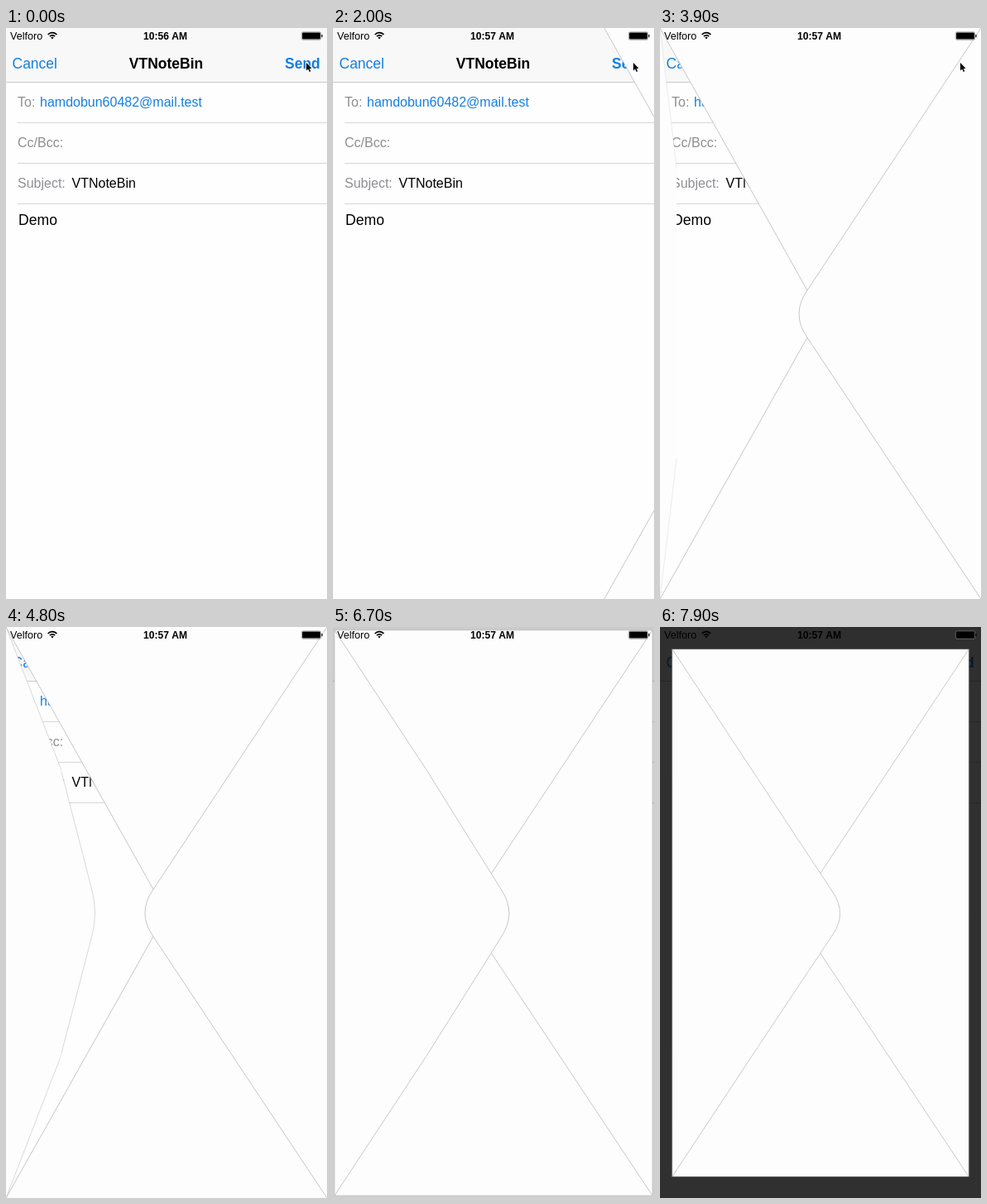
An HTML page with a canvas for the animation above (8000 ms loop, 388 by 690 pixels).

```html
<!DOCTYPE html>
<html lang="en">
<head>
<meta charset="utf-8">
<title>Mail folding into an envelope</title>
<style>
  html, body { margin: 0; width: 100%; height: 100%; overflow: hidden; background: #fefefe; }
  canvas { display: block; width: 388px; height: 690px; }
</style>
</head>
<body>
<canvas id="stage"></canvas>
<script>
const W = 388, H = 690, LOOP = 8;
const BLUE = '#147fe2', GREY = '#8e8e93', PAPER = '#fdfdfd', EDGE = '#b8b8b8';
const FONT = '"Liberation Sans", Arial, sans-serif';

const canvas = document.getElementById('stage');
const ctx = canvas.getContext('2d');
const dpr = window.devicePixelRatio || 1;
canvas.width = W * dpr;
canvas.height = H * dpr;

// Keys of [time, value], joined by straight lines.
const FOLD_INNER = [[3.5, 91], [3.9, 79.7], [5.6, 31.5], [6.7, 5], [6.9, 0]];
const FOLD_TIP = [[3.5, 104], [3.9, 93], [5.6, 44], [6.7, 19.3], [7.4, 0]];
const SHRINK = [[6.5, 0], [6.7, 0.01], [7.2, 0.044], [7.9, 0.0765]];
const DIM = [[6.5, 0], [6.7, 0.18], [7.2, 0.48], [7.9, 0.81]];

function along(keys, t) {
  if (t <= keys[0][0]) return keys[0][1];
  for (let i = 1; i < keys.length; i++) {
    const [t0, a] = keys[i - 1], [t1, b] = keys[i];
    if (t < t1) return a + (b - a) * (t - t0) / (t1 - t0);
  }
  return keys[keys.length - 1][1];
}

const cosDeg = deg => Math.cos(deg * Math.PI / 180);

function text(str, x, y, size, color = '#000', bold = false, align = 'left') {
  ctx.font = `${bold ? 'bold ' : ''}${size}px ${FONT}`;
  ctx.fillStyle = color;
  ctx.textAlign = align;
  ctx.fillText(str, x, y);
}

function rect(x, y, w, h, color) {
  ctx.fillStyle = color;
  ctx.fillRect(x, y, w, h);
}

function poly(points) {
  ctx.beginPath();
  points.forEach(([x, y]) => ctx.lineTo(x, y));
}

function stroke(alpha = 1) {
  ctx.globalAlpha = alpha;
  ctx.strokeStyle = EDGE;
  ctx.lineWidth = 0.8;
  ctx.stroke();
  ctx.globalAlpha = 1;
}

function drawPage() {
  rect(0, 0, W, H, '#fefefe');
  rect(0, 0, W, 65, '#f8f8f8');
  rect(0, 65, W, 1, '#cacaca');
  [114, 163, 212].forEach(y => rect(14, y, W - 14, 1, '#d6d6d8'));
  text('Cancel', 7.5, 49, 17.5, BLUE);
  text('VTNoteBin', 193.5, 49, 17.5, '#000', true, 'center');
  text('Send', 337, 49, 17.5, BLUE, true);
  text('To:', 14, 95, 16, GREY);
  text('hamdobun60482@mail.test', 41, 95, 16, BLUE);
  text('Cc/Bcc:', 14, 144, 16, GREY);
  text('Subject:', 14, 193, 16, GREY);
  text('VTNoteBin', 79.5, 193, 16);
  text('Demo', 15, 238, 17.6);
}

function drawStatus(t) {
  text('Velforo', 5, 14, 12.6);
  text(t < 1.2 ? '10:56 AM' : '10:57 AM', 192.5, 14, 12.1, '#000', true, 'center');

  ctx.strokeStyle = '#000';
  ctx.lineWidth = 1.7;
  [4.2, 7.3].forEach(r => {
    ctx.beginPath();
    ctx.arc(56, 13, r, -Math.PI * 0.76, -Math.PI * 0.24);
    ctx.stroke();
  });
  ctx.fillStyle = '#000';
  ctx.beginPath();
  ctx.moveTo(56, 13.6);
  ctx.arc(56, 13, 2.2, -Math.PI * 0.78, -Math.PI * 0.22);
  ctx.fill();

  ctx.strokeStyle = '#777';
  ctx.lineWidth = 0.6;
  ctx.beginPath();
  ctx.roundRect(357.3, 4.8, 23.4, 9.6, 1.8);
  ctx.stroke();
  ctx.beginPath();
  ctx.roundRect(358.1, 5.6, 21.8, 8, 1);
  ctx.fill();
  rect(381.3, 8, 1.2, 3.2, '#000');
}

// Pocket with the right flap glued over its top and bottom.
function drawPocket() {
  const pocket = () => {
    ctx.lineTo(178, 317);
    ctx.quadraticCurveTo(158, 345.5, 178, 374);
  };
  ctx.beginPath();
  ctx.moveTo(0, 0);
  pocket();
  ctx.lineTo(0, H);
  ctx.lineTo(W, H);
  ctx.lineTo(W, 0);
  ctx.closePath();
  ctx.fillStyle = PAPER;
  ctx.fill();
  poly([[0, 0], [178, 317]]);
  stroke();
  poly([[0, H], [178, 374]]);
  stroke();
  ctx.beginPath();
  ctx.moveTo(W, 0);
  pocket();
  ctx.lineTo(W, H);
  stroke();
}

// Left flap: two hinged panels, seen flat, so each narrows by its cosine.
function drawFlap(t) {
  const c1 = cosDeg(along(FOLD_INNER, t));
  const c2 = cosDeg(along(FOLD_TIP, t));
  if (c1 <= 0) return;
  const hinge = 112 * c1, top = 169.5, bottom = H - top;
  const alpha = Math.min(1, 0.2 + 0.8 * c1);

  ctx.fillStyle = PAPER;
  if (c2 > 0) {
    ctx.beginPath();
    ctx.moveTo(hinge, top);
    ctx.lineTo(hinge + 98 * c2, 317.5);
    ctx.quadraticCurveTo(hinge + 117 * c2, 345.5, hinge + 98 * c2, 373.5);
    ctx.lineTo(hinge, bottom);
    ctx.fill();
    stroke(alpha);
  }
  poly([[0, 0], [hinge, top], [hinge, bottom], [0, H]]);
  ctx.fill();
  // Cover the seam between the panels.
  if (c2 > 0) rect(hinge - 1, top + 3, 2, bottom - top - 6, PAPER);
  poly([[0, 0], [hinge, top]]);
  stroke(alpha);
  poly([[hinge, bottom], [0, H]]);
  stroke(alpha);
}

// Speeds up for one second, then glides left at a steady pace.
function pocketX(t) {
  const s = Math.max(0, t - 1.2), speed = 187.5;
  const gone = s < 1 ? speed * s * s / 2 : speed * (s - 0.5);
  return Math.max(0, W - gone);
}

function drawEnvelope(t) {
  const scale = 1 - along(SHRINK, t);
  ctx.save();
  ctx.translate(W / 2, H / 2 + 0.5 * (scale < 1));
  ctx.scale(scale, scale);
  ctx.translate(-W / 2, -H / 2);
  ctx.save();
  ctx.translate(pocketX(t), 0);
  drawPocket();
  ctx.restore();
  drawFlap(t);
  if (scale < 1) {
    ctx.beginPath();
    ctx.rect(0, 0, W, H);
    stroke(0.7);
  }
  ctx.restore();
}

function drawCursor() {
  ctx.save();
  ctx.translate(363, 42);
  poly([[0, 0], [0, 9.5], [2.2, 7.6], [3.7, 11], [5.3, 10.3], [3.8, 7], [6.6, 6.8]]);
  ctx.closePath();
  ctx.strokeStyle = '#fff';
  ctx.lineWidth = 1.4;
  ctx.stroke();
  ctx.fillStyle = '#000';
  ctx.fill();
  ctx.restore();
}

function draw(t) {
  ctx.setTransform(dpr, 0, 0, dpr, 0, 0);
  drawPage();
  const dim = along(DIM, t);
  if (dim > 0) rect(0, 0, W, H, `rgba(0, 0, 0, ${dim})`);
  if (t >= 1.2) drawEnvelope(t);
  drawStatus(t);
  if (t < 4.3) drawCursor();
}

const start = performance.now();
function tick() {
  draw((performance.now() - start) / 1000 % LOOP);
  requestAnimationFrame(tick);
}
tick();
</script>
</body>
</html>
```
